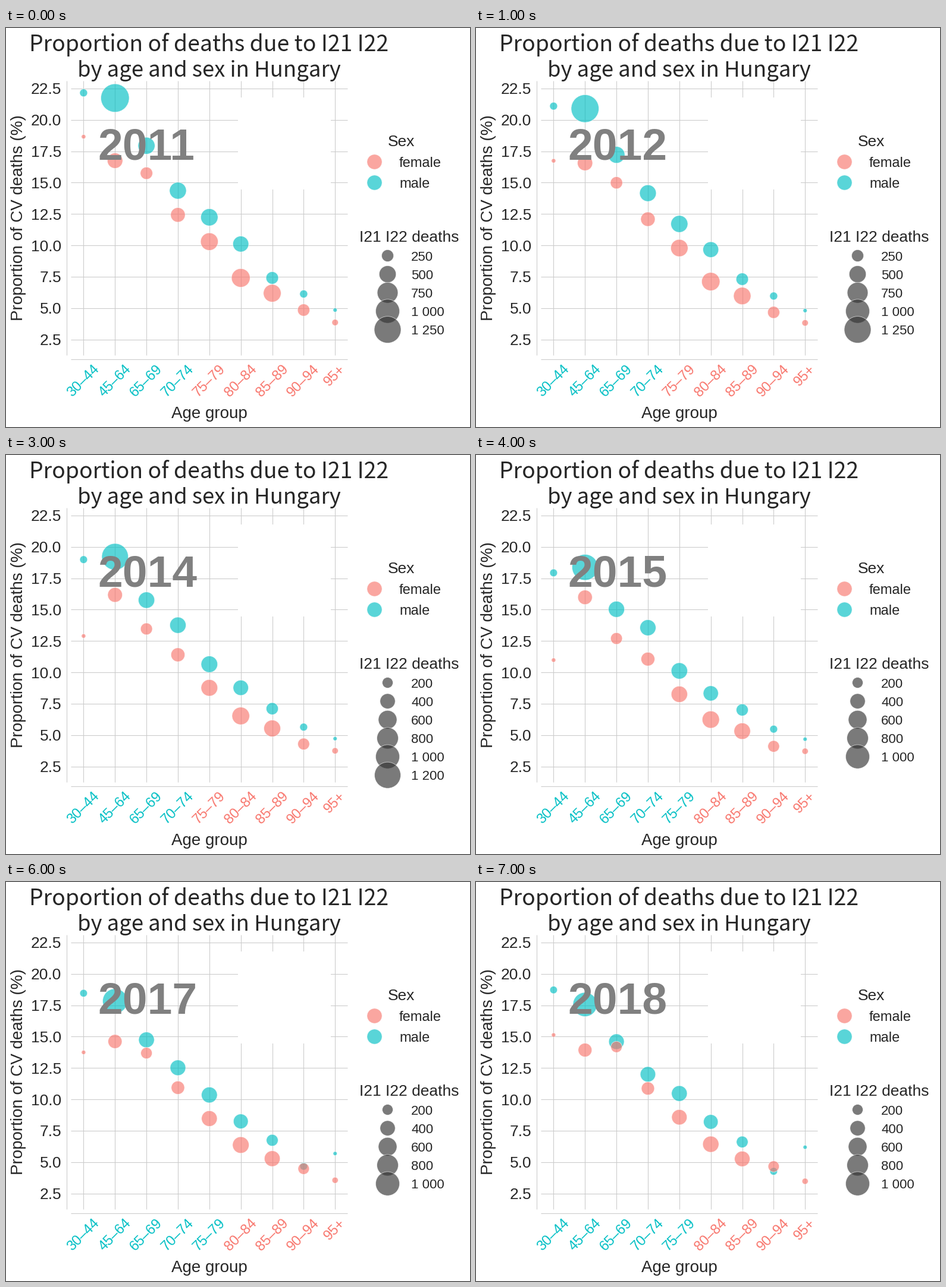
These frames come from a looping animation (780x672 px, 8000 ms). A matplotlib script:

```python
import numpy as np
import matplotlib.pyplot as plt
from matplotlib.animation import FuncAnimation
from matplotlib.patches import Circle, Rectangle

W, H, DPI = 780, 672, 100
TEAL, SALMON, INK, GRID = "#00BFC4", "#F8766D", "#262626", "#cccccc"
SANS, HUMANIST = "Liberation Sans", "Noto Sans CJK JP"
FIRST, LAST = 2011, 2018
KEY_YEARS = (FIRST, 2015, LAST)
THOUSAND_R = 20.1  # bubble radius for 1000 deaths

AGES = ["30–44", "45–64", "65–69", "70–74", "75–79",
        "80–84", "85–89", "90–94", "95+"]


class Series:
    """Bubbles of one sex: shares move between key years, radii shrink."""

    def __init__(self, color, shrink, radii, *shares):
        self.color, self.shrink = color, shrink
        self.radii, self.shares = np.array(radii), np.array(shares)

    def share(self, year):
        return [np.interp(year, KEY_YEARS, s) for s in self.shares.T]

    def radius(self, year):
        progress = (year - FIRST) / (LAST - FIRST)
        return self.radii - self.shrink * self.radii**2 * progress

    def draw(self):
        self.dots = [bubble(x, 0, 1, self.color) for x in AGE_X]

    def move(self, year):
        for dot, x, s, r in zip(self.dots, AGE_X, self.share(year),
                                self.radius(year)):
            dot.set_center((x, share_y(s)))
            dot.set_radius(r)


men = Series(
    TEAL, 0.0062, [6.5, 23.8, 14.2, 14.1, 14.4, 13.3, 10.4, 6.6, 3.4],
    [22.15, 21.74, 17.94, 14.36, 12.24, 10.11, 7.41, 6.13, 4.85],
    [17.93, 18.37, 15.03, 13.56, 10.12, 8.33, 7.01, 5.48, 4.68],
    [18.72, 17.56, 14.60, 12.00, 10.47, 8.21, 6.61, 4.27, 6.19])
women = Series(
    SALMON, 0.0085, [3.6, 12.9, 10.3, 12.2, 14.7, 15.6, 14.8, 10.2, 5.3],
    [18.66, 16.75, 15.75, 12.43, 10.30, 7.41, 6.19, 4.85, 3.86],
    [10.98, 15.98, 12.70, 11.06, 8.26, 6.24, 5.32, 4.11, 3.72],
    [15.13, 13.93, 14.18, 10.87, 8.58, 6.43, 5.26, 4.66, 3.48])

AGE_X = 130.42 + 52.85 * np.arange(len(AGES))


def share_y(percent):
    return 101.84 + 21.143 * (22.5 - percent)


fig = plt.figure(figsize=(W / DPI, H / DPI), dpi=DPI, facecolor="white")
ax = fig.add_axes([0, 0, 1, 1])
ax.set_xlim(0, W)
ax.set_ylim(H, 0)
ax.axis("off")


def line(x0, y0, x1, y1):
    ax.plot([x0, x1], [y0, y1], color=GRID, lw=0.8, zorder=0.5,
            solid_capstyle="butt")


def label(x, y, text, pt, ha="left", va="baseline", color=INK, font=SANS, **kw):
    return ax.text(x, y, text, fontsize=pt, ha=ha, va=va, color=color,
                   fontfamily=font, **kw)


def bubble(x, y, r, color):
    return ax.add_patch(Circle((x, y), r, facecolor=color, edgecolor="white",
                               lw=0.6, alpha=0.65))


# Grid, spines and axis text
for x in AGE_X:
    line(x, 89, x, 551)
for percent in np.arange(2.5, 23, 2.5):
    y = share_y(percent)
    line(109, y, 574, y)
    label(93, y + 9.5, f"{percent:.1f}", 19, ha="right")
line(102, 89, 102, 551)
line(109, 558, 574, 558)
ax.add_patch(Rectangle((390, 117), 156, 155, color="white", lw=0))

label(341.5, 39, "Proportion of deaths due to I21 I22", 26.9, ha="center",
      font=HUMANIST)
label(341.5, 82, "by age and sex in Hungary", 26.3, ha="center", font=HUMANIST)
label(342, 657, "Age group", 20, ha="center")
label(28.5, 320, "Proportion of CV deaths (%)", 20, ha="center", rotation=90,
      rotation_mode="anchor")
age_labels = [label(x, 563.5, age, 17, ha="center", va="top", rotation=45)
              for x, age in zip(AGE_X, AGES)]

# Legends
label(664.5, 199, "Sex", 19, ha="center")
for y, name, color in ((225.5, "female", SALMON), (260.5, "male", TEAL)):
    bubble(619.5, y, 12.6, color)
    label(661, y + 8.5, name, 17)
label(678, 360.5, "I21 I22 deaths", 19, ha="center")
size_y = 383.5 + 31.15 * np.arange(6)
size_dots = [bubble(641.5, y, 1, "#333333") for y in size_y]
size_texts = [label(681, y + 8, "", 16) for y in size_y]

men.draw()
women.draw()
year_text = label(154, 222, "", 54, color="#808080", weight="bold")


def update_size_legend(biggest):
    step = 250 if biggest > 1250 else 200
    for k, (dot, text) in enumerate(zip(size_dots, size_texts), start=1):
        deaths = step * k
        dot.set_radius(THOUSAND_R * np.sqrt(deaths / 1000))
        text.set_text(f"{deaths:,}".replace(",", " "))
        for part in (dot, text):
            part.set_visible(deaths <= biggest)


def update(i):
    year = FIRST + i
    year_text.set_text(str(year))
    men.move(year)
    women.move(year)

    # Each age label takes the colour of the sex with more deaths.
    male_r, female_r = men.radius(year), women.radius(year)
    for text, m, f in zip(age_labels, male_r, female_r):
        text.set_color(TEAL if m > f else SALMON)
    update_size_legend(1000 * (male_r.max() / THOUSAND_R) ** 2)
    return []


anim = FuncAnimation(fig, update, frames=LAST - FIRST + 1, interval=1000,
                     init_func=lambda: update(0), repeat=True, repeat_delay=0)
plt.show()
```
